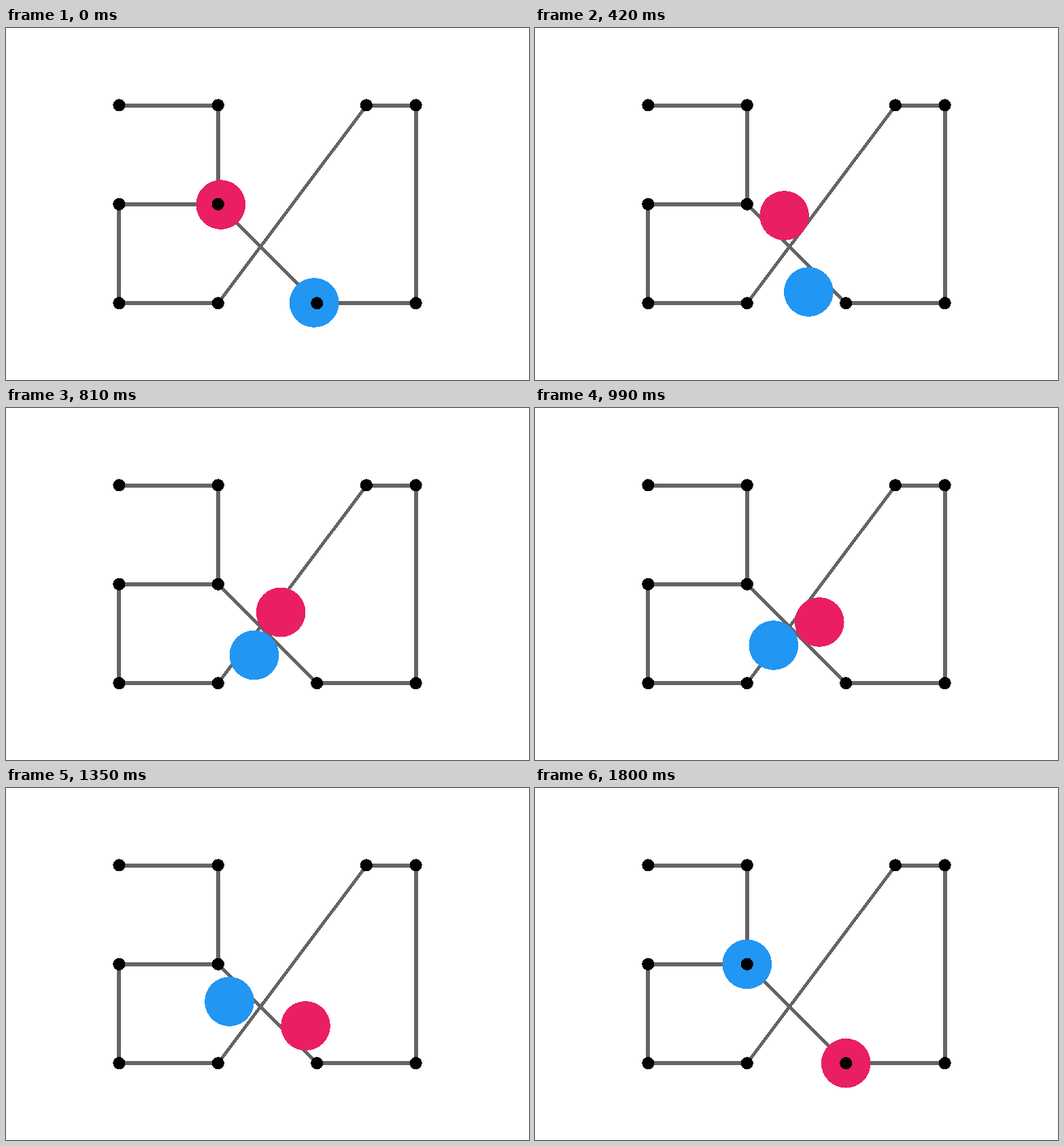
These frames come from a looping animation (769 px wide and 517 px high, 1.83 s). An HTML page:

```html
<!DOCTYPE html>
<html lang="en">
<head>
<meta charset="utf-8">
<title>Swapping counters</title>
<style>
  html, body { margin: 0; width: 100%; height: 100%; overflow: hidden; background: #fff; }
  svg { display: block; width: 769px; height: 517px; shape-rendering: crispEdges; }

  /* Progress of a swap, from 0 to 1 */
  @property --s { syntax: "<number>"; inherits: false; initial-value: 0; }

  .edges { fill: none; stroke: #646464; stroke-width: 6; }
  .ball {
    --u: 72.7px;
    /* Quadratic curve bulging sideways by half a unit; --dir mirrors it */
    transform: translate(
      calc(var(--dir) * var(--u) * var(--s) * (3.4142 - 1.4142 * var(--s))),
      calc(var(--dir) * var(--u) * var(--s) * (0.5858 + 1.4142 * var(--s))));
    animation: swap 1830ms steps(61, start) infinite;
  }
  .red { --dir: 1; fill: #e91e63; }
  .blue { --dir: -1; fill: #2196f3; }
  @keyframes swap { from { --s: 0; } to { --s: 1; } }
</style>
</head>
<body>
<svg viewBox="0 0 769 517">
  <g class="edges">
    <path d="M166 114H312V259H166V404H312M530 114H603V404H457"/>
    <path d="M312 259L457 404" stroke-width="4.3"/>
    <path d="M312 404L530 114" stroke-width="4.8"/>
  </g>
  <circle class="ball red" cx="311.8" cy="258.8" r="36.35"/>
  <circle class="ball blue" cx="457.2" cy="404.2" r="36.35"/>
  <g>
    <circle cx="166.4" cy="113.4" r="9.1"/>
    <circle cx="311.8" cy="113.4" r="9.1"/>
    <circle cx="529.9" cy="113.4" r="9.1"/>
    <circle cx="602.6" cy="113.4" r="9.1"/>
    <circle cx="166.4" cy="258.8" r="9.1"/>
    <circle cx="311.8" cy="258.8" r="9.1"/>
    <circle cx="166.4" cy="404.2" r="9.1"/>
    <circle cx="311.8" cy="404.2" r="9.1"/>
    <circle cx="457.2" cy="404.2" r="9.1"/>
    <circle cx="602.6" cy="404.2" r="9.1"/>
  </g>
</svg>
</body>
</html>
```
